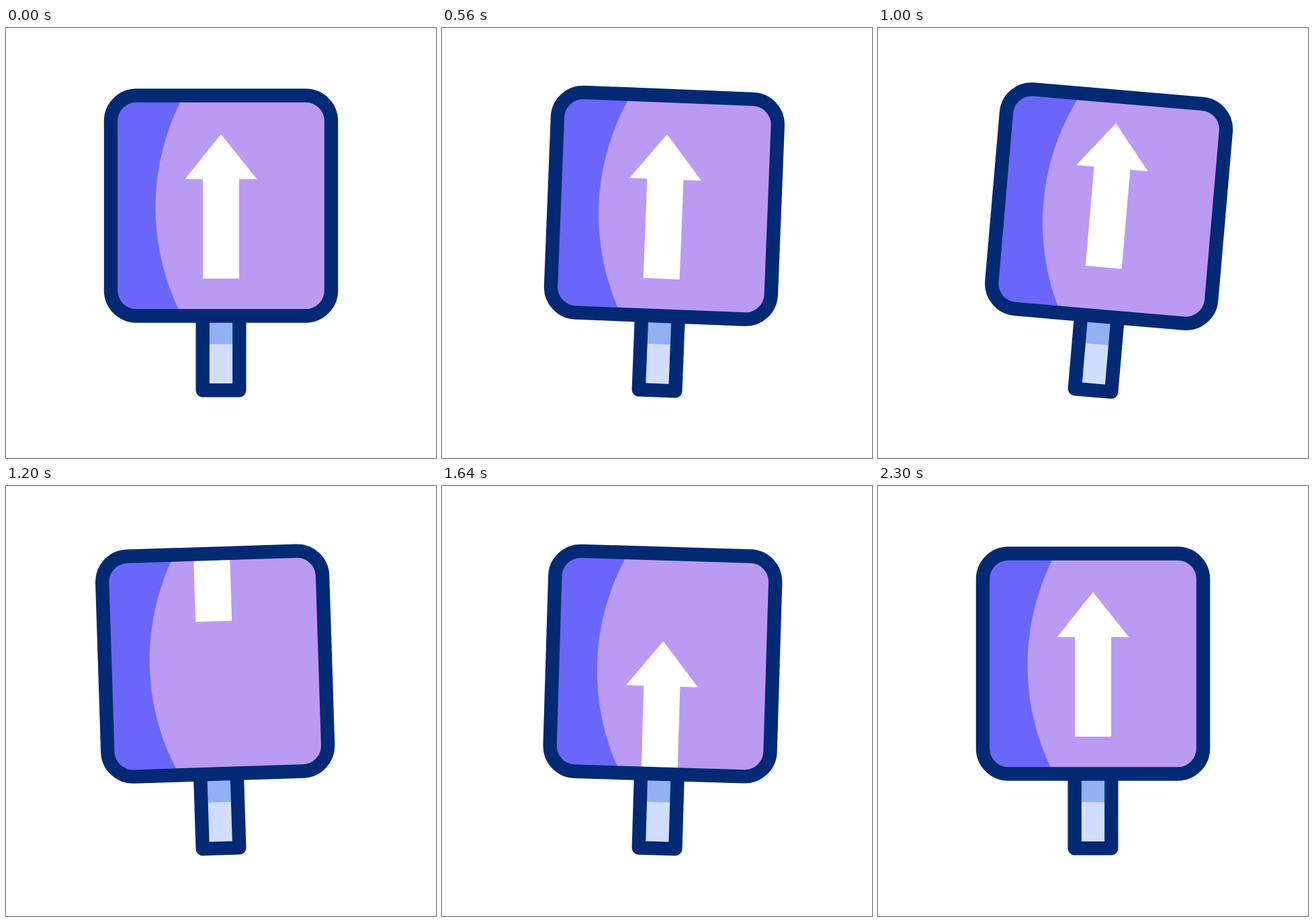
Recreate the animation shown at these times as an HTML page. Size 640 by 640 pixels, loop 3020 ms.

```html
<!DOCTYPE html>
<html lang="en">
<head>
<meta charset="utf-8">
<title>Direction sign</title>
<style>
  html, body { margin: 0; width: 100%; height: 100%; overflow: hidden; background: #fff; }
  svg { display: block; width: 100vw; height: 100vh; }
</style>
</head>
<body>
<svg viewBox="0 0 640 640">
  <defs>
    <clipPath id="panel"><rect x="156" y="100.5" width="328" height="328" rx="38"/></clipPath>
  </defs>
  <g id="sign">
    <path d="M292.7 430V539.3H347.3V430Z" fill="#d1ddfd"/>
    <path d="M292.7 430H347.3V470.5H292.7Z" fill="#92b0f3"/>
    <path d="M292.7 430V539.3H347.3V430" fill="none" stroke="#022a74" stroke-width="20.4" stroke-linejoin="round"/>
    <g clip-path="url(#panel)">
      <rect x="150" y="95" width="340" height="340" fill="#6a66fa"/>
      <circle cx="574.5" cy="267" r="352" fill="#bb9af3"/>
      <path id="arrow" d="M320 158L373.5 225H347V373H293V225H266.5Z" fill="#fff"/>
    </g>
    <rect x="156" y="100.5" width="328" height="328" rx="38" fill="none" stroke="#022a74" stroke-width="20.4"/>
  </g>
</svg>
<script>
  const STEP = 20, STEPS = 151;
  const sign = document.getElementById('sign');
  const arrow = document.getElementById('arrow');

  // Keys: [step, value, end handle of the ease that arrives here]
  const tilt = [[15, 0], [45, 6.28, .76], [68, -4.97], [85, 2.35], [97, -1.33], [103, 0]];
  const leave = [[46.4, 0], [70, -280]];
  const enter = [[70, 280], [89, -19], [115, 0]];

  // Cubic Bezier (1/3, 0, handle, 1), solved by bisection
  function ease(x, handle) {
    let lo = 0, hi = 1, s = .5;
    for (let i = 0; i < 24; i++) {
      s = (lo + hi) / 2;
      const r = 1 - s;
      if (r * r * s + 3 * r * s * s * handle + s ** 3 < x) lo = s; else hi = s;
    }
    return s * s * (3 - 2 * s);
  }

  function valueAt(keys, step) {
    if (step <= keys[0][0]) return keys[0][1];
    for (let i = 1; i < keys.length; i++) {
      const [from, a] = keys[i - 1], [to, b, handle = 2 / 3] = keys[i];
      if (step < to) return a + (b - a) * ease((step - from) / (to - from), handle);
    }
    return keys[keys.length - 1][1];
  }

  function draw(ms) {
    const step = Math.floor(ms / STEP) % STEPS;
    const lift = valueAt(step < 70 ? leave : enter, step);
    sign.setAttribute('transform', `rotate(${valueAt(tilt, step).toFixed(3)} 320 540)`);
    arrow.setAttribute('transform', `translate(0 ${lift.toFixed(2)})`);
  }

  let start;
  function tick(now) {
    start ??= now;
    draw(Math.max(0, now - start));
    requestAnimationFrame(tick);
  }
  draw(0);
  requestAnimationFrame(tick);
</script>
</body>
</html>
```
